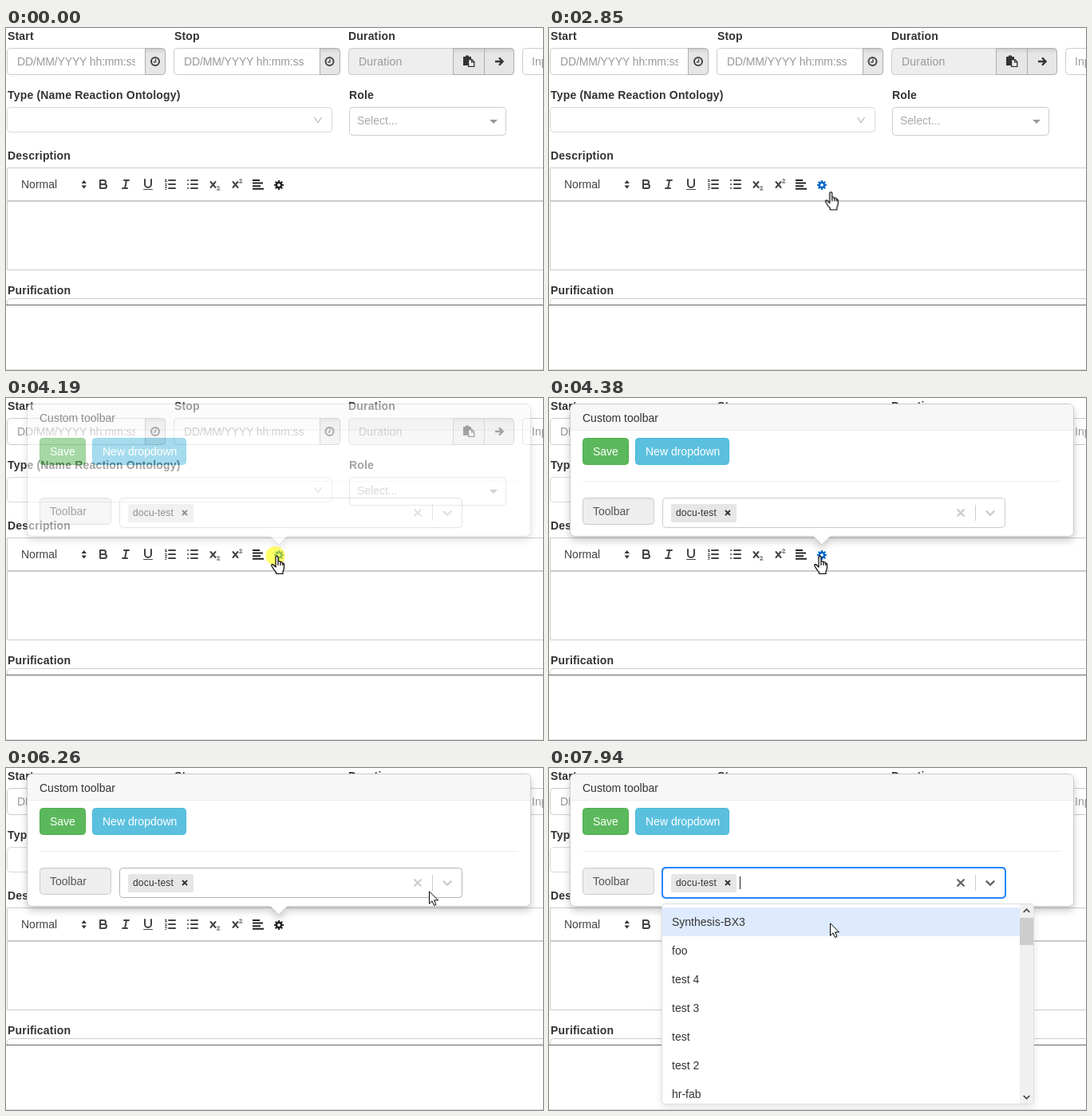
Animation of 673x429 px, one loop 8000 ms. Source, as an HTML page:

```html
<!DOCTYPE html>
<html lang="en">
<head>
<meta charset="utf-8">
<title>Custom toolbar</title>
<style>
html, body { margin: 0; width: 100%; height: 100%; overflow: hidden; background: #fff; }
#stage { display: block; width: 673px; height: 429px; }
text { font: 14px "Liberation Sans", Arial, sans-serif; fill: #333; }
.label { font-weight: bold; letter-spacing: .18px; }
.hint { fill: #999; }
.date { letter-spacing: -.14px; }
.white { fill: #fff; }
.tag { font-size: 12px; letter-spacing: .18px; }
.box { fill: #fff; stroke: #ccc; }
.press { fill: url(#press); stroke: #adadad; }
.line { fill: none; stroke: #ccc; }
.icon { fill: none; stroke: #444; stroke-width: 2; stroke-linecap: round; stroke-linejoin: round; }
.thin { stroke-width: 1; }
.solid { fill: #333; stroke: none; }
.pointer { fill: #fff; stroke: #000; stroke-linejoin: round; }
.shade { filter: drop-shadow(0 5px 5px rgba(0,0,0,.2)); }

#mouse { animation: travel 8s linear infinite; }
#arrow, #hand, #beam, #halo, #menu, #caret, #focus, #gear, #frame, #marks { animation: 8s step-end infinite; }
#arrow { animation-name: arrow; }
#hand { animation-name: hand; }
#beam { animation-name: beam; }
#halo { animation-name: halo; }
#menu { animation-name: menu; }
#caret { animation-name: caret; }
#focus { animation-name: focus; }
#gear { animation-name: gear; }
#frame { animation-name: frame; }
#marks { animation-name: marks; }
#popover { animation: popover 8s step-end infinite; }

@keyframes travel {
  0% { transform: translate(700px, 500px); animation-timing-function: step-end; }
  12.45% { transform: translate(624px, 415px); animation-timing-function: steps(6); }
  17.5% { transform: translate(575px, 372px); animation-timing-function: steps(5); }
  21.7% { transform: translate(510px, 315px); animation-timing-function: step-end; }
  22.7% { transform: translate(491px, 300px); animation-timing-function: step-end; }
  23.6% { transform: translate(472px, 286px); animation-timing-function: steps(5); }
  28% { transform: translate(405px, 240px); animation-timing-function: steps(5); }
  32.35% { transform: translate(364px, 212px); animation-timing-function: step-end; }
  32.95% { transform: translate(360px, 210px); animation-timing-function: steps(8); }
  39.85% { transform: translate(338px, 198px); animation-timing-function: step-end; }
  69.75% { transform: translate(338px, 198px); animation-timing-function: steps(5); }
  74% { transform: translate(400px, 180px); animation-timing-function: steps(5); }
  78.2% { transform: translate(530px, 154px); animation-timing-function: step-end; }
  79.1% { transform: translate(543px, 151px); animation-timing-function: step-end; }
  79.95% { transform: translate(551px, 149px); animation-timing-function: step-end; }
  91.5% { transform: translate(551px, 149px); animation-timing-function: steps(3); }
  94.05% { transform: translate(505px, 160px); animation-timing-function: steps(3); }
  96.6% { transform: translate(420px, 180px); animation-timing-function: steps(3); }
  99.2%, 100% { transform: translate(352px, 194px); }
}
@keyframes arrow { 0%, 32.35%, 70.6%, 100% { opacity: 1; } 22.7%, 35.6% { opacity: 0; } }
@keyframes beam { 0%, 32.35%, 100% { opacity: 0; } 22.7% { opacity: 1; } }
@keyframes hand { 0%, 70.6%, 100% { opacity: 0; } 35.6% { opacity: 1; } }
@keyframes halo { 0%, 53.1%, 84.95%, 100% { opacity: 0; } 49.95%, 80.95% { opacity: .6; } }
@keyframes popover { 0% { opacity: 0; } 51.45% { opacity: .15; } 52.3% { opacity: .55; } 53.1% { opacity: .9; } 54%, 100% { opacity: 1; } }
@keyframes menu { 0% { opacity: 0; } 83.2%, 100% { opacity: 1; } }
@keyframes caret { 0%, 90.1% { opacity: 0; } 83.2%, 96.7%, 100% { opacity: 1; } }
@keyframes focus { 0% { opacity: 0; } 84.95%, 100% { opacity: 1; } }
@keyframes gear { 0%, 70.6%, 100% { color: #222; } 35.6% { color: #06c; } }
@keyframes frame { 0% { stroke: #ccc; } 77.4% { stroke: #b3b3b3; } 84.1%, 100% { stroke: #94a5bd; } }
@keyframes marks { 0% { color: #ccc; } 84.95%, 100% { color: #666; } }
</style>
</head>
<body>
<svg id="stage" viewBox="0 0 673 429" xmlns="http://www.w3.org/2000/svg">
  <defs>
    <linearGradient id="press" x2="0" y2="1">
      <stop stop-color="#cfcfcf"/><stop offset=".2" stop-color="#e6e6e6"/>
    </linearGradient>
    <linearGradient id="sunk" x2="0" y2="1">
      <stop stop-color="#e3e3e3"/><stop offset=".08" stop-color="#eee"/>
    </linearGradient>
    <g id="clock">
      <circle class="icon" r="5" stroke-width="2"/>
      <path class="icon" style="stroke-width:1.4" d="M.5-2.5V.7H-1.8"/>
    </g>
    <path id="list" d="M7 4H15M7 9H15M7 14H15"/>
    <path id="ex" d="M4.5 6L10.5 13M10.5 6L4.5 13"/>
  </defs>

  <!-- form -->
  <g>
    <text class="label" x="2" y="15">Start</text>
    <text class="label" x="211" y="15">Stop</text>
    <text class="label" x="429" y="15">Duration</text>

    <path class="box" d="M174.500 25.500H5.500a4 4 0 0 0-4 4v25a4 4 0 0 0 4 4H174.500z"/>
    <svg width="162" height="60"><text class="hint date" x="14" y="47">DD/MM/YYYY hh:mm:ss</text></svg>
    <path class="press" d="M174.500 25.500h21a4 4 0 0 1 4 4v25a4 4 0 0 1-4 4h-21z"/>
    <use href="#clock" x="187" y="42"/>

    <path class="box" d="M393.500 25.500H214.500a4 4 0 0 0-4 4v25a4 4 0 0 0 4 4H393.500z"/>
    <text class="hint date" x="223" y="47">DD/MM/YYYY hh:mm:ss</text>
    <path class="press" d="M393.500 25.500h21a4 4 0 0 1 4 4v25a4 4 0 0 1-4 4h-21z"/>
    <use href="#clock" x="405.500" y="42"/>

    <path class="line" style="fill:url(#sunk)" d="M560.500 25.500H433.500a4 4 0 0 0-4 4v25a4 4 0 0 0 4 4H560.500z"/>
    <text class="hint" x="442" y="47" letter-spacing=".2">Duration</text>
    <path class="press" d="M560.500 25.500h39v33h-39z"/>
    <path class="press" d="M599.500 25.500h33a4 4 0 0 1 4 4v25a4 4 0 0 1-4 4h-33z"/>
    <path class="solid" d="M573 36h3v-1.500h4V36h3v3h-4v8h-6z"/>
    <path fill="#eee" stroke="#333" stroke-width="1.300" d="M579.600 39.600h4.500l2.700 2.800v5.900h-7.200zM583.600 39.600v3.200h3.200"/>
    <path class="icon" style="stroke:#333;stroke-width:2.300;stroke-linecap:butt;stroke-linejoin:miter" d="M613 42H622M618 37.400L622.600 42L618 46.600"/>

    <rect class="box" x="647.500" y="25.500" width="60" height="33" rx="4"/>
    <text class="hint" x="659" y="47">Input</text>

    <text class="label" x="2" y="89">Type (Name Reaction Ontology)</text>
    <rect class="box" style="stroke:#d9d9d9" x="1.500" y="99.500" width="407" height="31" rx="4"/>
    <path class="line" style="stroke:#bbb;stroke-width:1.300" d="M386.500 112L391 118.500L395.500 112"/>
    <text class="label" x="430" y="89">Role</text>
    <rect class="box" x="430.500" y="99.500" width="196" height="35" rx="4"/>
    <text x="440" y="121" style="fill:#aaa">Select...</text>
    <path fill="#999" d="M606 115h10l-5 5z"/>

    <text class="label" x="2" y="165">Description</text>
    <path class="line" d="M680 175.500H1.500V303.500H680"/>
    <path class="line" stroke-width="2" d="M1 217H680"/>
    <text x="19" y="201" style="fill:#444">Normal</text>
    <path fill="#333" d="M94.500 195l3.200-4 3.200 4zM94.500 197.500l3.200 4 3.200-4z"/>
    <g class="icon">
      <path transform="translate(113 187)" d="M5 4H9.500a2.500 2.500 0 0 1 0 5H5zM5 9h5.500a2.500 2.500 0 0 1 0 5H5z"/>
      <path transform="translate(141 187)" d="M7 4H13M5 14H11M8 14L10 4"/>
      <g transform="translate(169 187)">
        <path d="M5 3V9a4 4 0 0 0 8 0V3"/>
        <path class="thin" d="M3.500 15.500H14.500"/>
      </g>
      <g transform="translate(197 187)">
        <use href="#list"/>
        <path class="thin" d="M2.500 3.500l1-.8V5.500M2.500 5.500h2M2.500 8q1.500-1 1.800.3L2.500 10.500h2M2.500 12.500h1.800l-.8 1.300q1.500.5 0 1.700h-1"/>
      </g>
      <g transform="translate(225 187)">
        <use href="#list"/>
        <path d="M3 4h.01M3 9h.01M3 14h.01"/>
      </g>
      <g transform="translate(253 187)">
        <use href="#ex" x="-1"/>
        <path class="thin" d="M11.500 12.500q1.500-1.800 3 0 0 1-3 3.500h3.500"/>
      </g>
      <g transform="translate(281 187)">
        <use href="#ex" x="-1"/>
        <path class="thin" d="M11.500 3.500q1.500-1.800 3 0 0 1-3 3.500h3.500"/>
      </g>
    </g>
    <path fill="#222" d="M309 190h9v2h-9zM309 193.600h13v2h-13zM309 197.200h10v2h-10zM309 200.800h14v2h-14z"/>
    <g id="gear" transform="translate(342 197)" fill="none" stroke="currentColor">
      <circle r="3.200" stroke-width="2.600"/>
      <circle r="5" stroke-width="2.200" pathLength="16" stroke-dasharray="1" stroke-dashoffset=".5"/>
    </g>

    <text class="label" x="2" y="334">Purification</text>
    <rect class="box" x="1.500" y="339.500" width="700" height="40" rx="4"/>
    <path fill="#fff" d="M0 347h673v82H0z"/>
    <path stroke="#666" d="M0 347.500H673"/>
    <path stroke="#ddd" d="M0 428.500H673"/>
  </g>

  <!-- settings popover -->
  <g id="popover">
    <path class="box shade" d="M32.500 7.500H651.500a6 6 0 0 1 6 6V167.500a6 6 0 0 1-6 6H352.500L342 184L331.500 173.500H32.500a6 6 0 0 1-6-6V13.500a6 6 0 0 1 6-6z"/>
    <path fill="#f7f7f7" d="M27 41V13.500a5.500 5.500 0 0 1 5.500-5.500H651.500a5.500 5.500 0 0 1 5.500 5.500V41z"/>
    <path stroke="#ebebeb" d="M27 40.500H657"/>
    <text x="42" y="30">Custom toolbar</text>
    <rect x="42.500" y="50.500" width="57" height="33" rx="4" fill="#5cb85c" stroke="#4cae4c"/>
    <text class="white" x="55" y="72">Save</text>
    <rect x="108.500" y="50.500" width="117" height="33" rx="4" fill="#5bc0de" stroke="#46b8da"/>
    <text class="white" x="121" y="72">New dropdown</text>
    <path stroke="#eee" d="M42 104.500H642"/>
    <rect class="line" style="fill:url(#sunk)" x="42.500" y="125.500" width="89" height="33" rx="4"/>
    <text x="55" y="147" style="fill:#555">Toolbar</text>

    <rect id="frame" fill="#fff" x="142.500" y="125.500" width="429" height="37" rx="4"/>
    <rect id="focus" fill="none" stroke="#2684ff" stroke-width="2" x="142" y="125" width="430" height="38" rx="4"/>
    <rect x="153" y="133" width="82" height="23" rx="2" fill="#e6e6e6"/>
    <text class="tag" x="159" y="148">docu-test</text>
    <path stroke="#333" stroke-width="1.900" d="M221 141l6 6M227 141l-6 6"/>
    <path class="line" d="M534.500 134V154"/>
    <g id="marks" fill="none" stroke="currentColor" stroke-width="2.300" stroke-linecap="round">
      <path d="M512.200 140.200l7.600 7.600M519.800 140.200l-7.600 7.600"/>
      <path d="M548.300 142.200l4.700 4.500 4.700-4.500"/>
    </g>
    <path id="caret" fill="#222" d="M239 136h1v16h-1z"/>
  </g>

  <!-- option list -->
  <g id="menu">
    <rect x="141.500" y="170.500" width="466" height="251" rx="4" fill="#fff" stroke="#dedede" style="filter:drop-shadow(0 4px 5px rgba(0,0,0,.1))"/>
    <path fill="#deebff" d="M142 175h448v36H142z"/>
    <svg width="590" height="421">
      <text x="154" y="198">Synthesis-BX3</text>
      <text x="154" y="234">foo</text>
      <text x="154" y="270">test 4</text>
      <text x="154" y="306">test 3</text>
      <text x="154" y="342">test</text>
      <text x="154" y="378">test 2</text>
      <text x="154" y="414">hr-fab</text>
    </svg>
    <path fill="#f0f0f0" d="M590 171h14a3 3 0 0 1 3 3v244a3 3 0 0 1-3 3h-14z"/>
    <path fill="#cdcdcd" d="M590 188h17v34h-17z"/>
    <path fill="none" stroke="#444" stroke-width="1.700" d="M594.700 181l3.800-3.800 3.800 3.800M594.700 411l3.800 3.800 3.800-3.800"/>
  </g>

  <g id="mouse">
    <circle id="halo" cx="-.5" r="12" fill="#ff0"/>
    <path id="arrow" class="pointer" d="M.5 .8V16.300L4 12.900L6.500 18.500L9 17.400L6.600 11.900H11.500z"/>
    <path id="hand" class="pointer" stroke-width="1.200" d="M0 1.700Q0 .4 1.500 .4T3 1.700V7Q5.500 6.200 6 8Q8.300 7.400 8.700 9.200Q10.500 9 10.500 11V15Q10.300 17.500 9 19.500V22.500H.5V20.500Q-2 18-3.500 15.200L-5.200 12.500Q-5.500 10.800-4 10.700Q-2.500 11-1.200 13L0 14.200zM3 7V12M6 8V12M8.700 9.200V12"/>
    <path id="beam" fill="none" stroke="#111" d="M-3-7H-.5L.5-6L1.500-7H4M.5-6V6M-3 7.500H-.5L.5 6L1.500 7.500H4"/>
  </g>
</svg>
</body>
</html>
```
